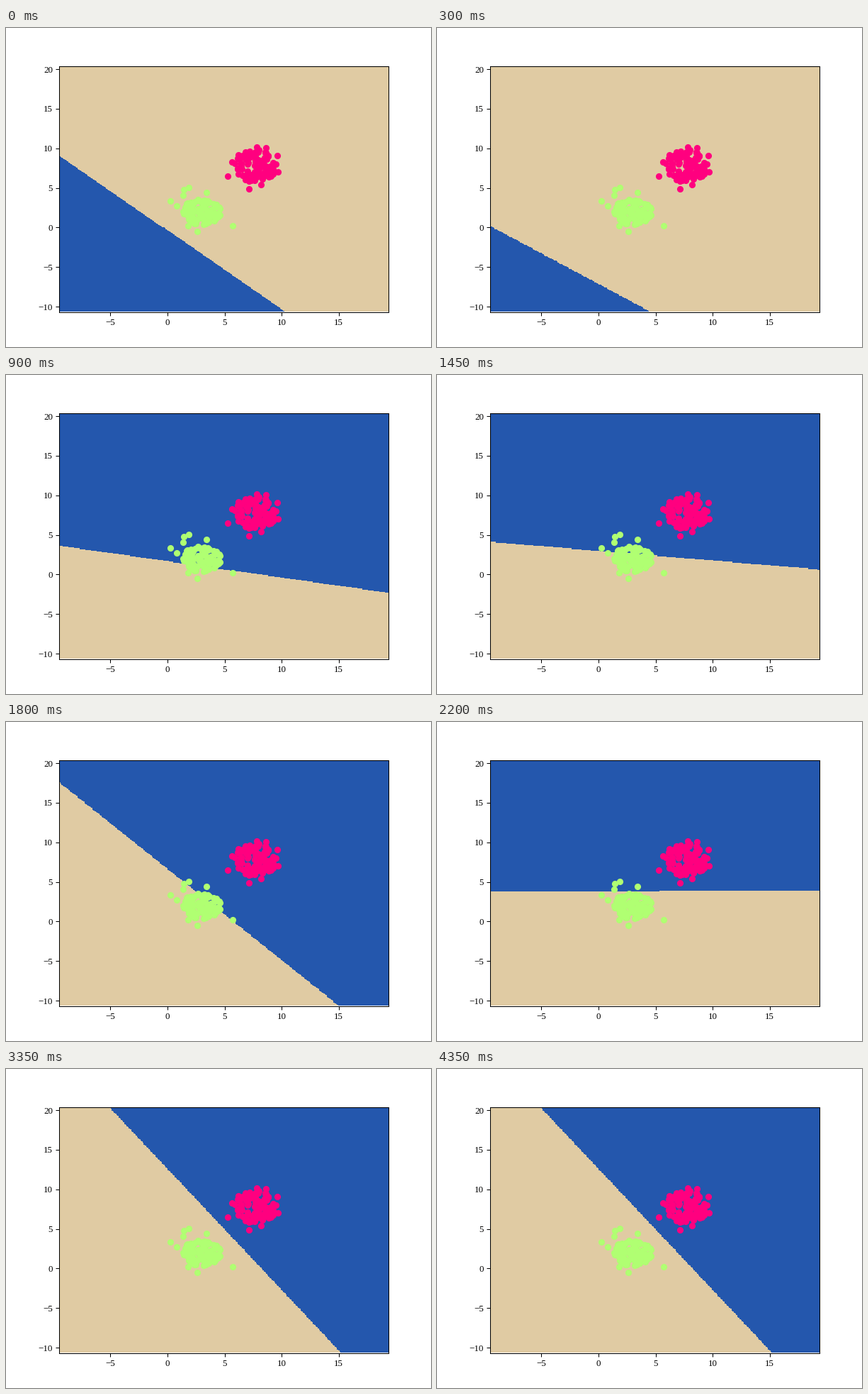
Recreate the animation shown at these times as a matplotlib script. Size 600 by 450 pixels, loop 4.45 s.

```python
import numpy as np
import matplotlib.pyplot as plt
from matplotlib.animation import FuncAnimation
from matplotlib.colors import ListedColormap

plt.rcParams["font.family"] = "Liberation Serif"

FRAMES, STEP_MS = 89, 50
XLIM, YLIM = (-9.49, 19.36), (-10.66, 20.37)
TAN, BLUE = "#E0CBA3", "#2457AD"
PINK, GREEN = "#FF007F", "#B0FF72"

# Key states (frame, w1, w2, bias); blue where w1*x + w2*y + bias > 0
KEYS = np.array([
    (0, -0.99, -1, -0.42),
    (6, -0.77, -1, -7.17),
    (11, 1.57, 1, -1.6),
    (18, 0.206, 1, -1.62),
    (29, 0.121, 1, -2.92),
    (44, -0.0045, 1, -3.78),
    (53, 0.862, 1, -2.84),
    (64, 1.527, 1, -12.52),
])
SWING_START, KICK, PIVOT_X = 18, 1.1, 3.0


def cluster(rng, strays, center, radii, count):
    """Points filling an ellipse, plus a few strays around it."""
    angle = rng.uniform(0, 2 * np.pi, count)
    r = np.sqrt(rng.uniform(0, 1, count))
    disc = np.column_stack([np.cos(angle), np.sin(angle)]) * r[:, None]
    return np.vstack([strays, np.array(center) + disc * radii])


def cell_centers(lim, size=0.1):
    n = round((lim[1] - lim[0]) / size)
    edges = np.linspace(*lim, n + 1)
    return (edges[:-1] + edges[1:]) / 2


gx, gy = np.meshgrid(cell_centers(XLIM), cell_centers(YLIM))


def weights(frame):
    times = KEYS[:, 0]
    w1, w2, bias = (np.interp(frame, times, col) for col in KEYS[:, 1:].T)
    if frame > SWING_START:
        # between settled states the boundary tilts about the lower cluster
        phase = np.interp(frame, times, np.arange(len(times)))
        tilt = KICK * np.sin(np.pi * phase) ** 2
        w1, bias = w1 + tilt, bias - tilt * PIVOT_X
    return w1, w2, bias


def classify(frame):
    w1, w2, bias = weights(frame)
    return (w1 * gx + w2 * gy + bias > 0).astype(float)


fig, ax = plt.subplots(figsize=(6.4, 4.8), dpi=93.75)
region = ax.imshow(classify(0), extent=(*XLIM, *YLIM), origin="lower",
                   aspect="auto", interpolation="nearest",
                   cmap=ListedColormap([TAN, BLUE]), vmin=0, vmax=1)

rng = np.random.default_rng(4)
green_strays = [(0.22, 3.36), (0.84, 2.74), (1.36, 4.08), (1.43, 4.8),
                (1.86, 5.07), (3.41, 4.44), (5.7, 0.22), (2.63, -0.49),
                (1.8, 0.22)]
pink_strays = [(5.25, 6.5), (7.16, 4.89), (7.81, 10.18), (8.6, 10.05),
               (9.61, 9.1), (9.67, 7.0), (5.64, 8.3), (8.2, 5.4),
               (6.2, 9.19)]
for color, points in [
    (GREEN, cluster(rng, green_strays, (2.95, 1.95), (1.75, 1.6), 90)),
    (PINK, cluster(rng, pink_strays, (7.7, 7.8), (1.85, 2.05), 90)),
]:
    ax.scatter(*points.T, c=color, s=36, zorder=2)

ax.set_xlim(XLIM)
ax.set_ylim(YLIM)
ax.set_xticks(range(-5, 16, 5))
ax.set_yticks(range(-10, 21, 5))


def update(frame):
    region.set_data(classify(frame))
    return [region]


anim = FuncAnimation(fig, update, frames=FRAMES, interval=STEP_MS,
                     repeat=True, repeat_delay=0, blit=False)
plt.show()
```
